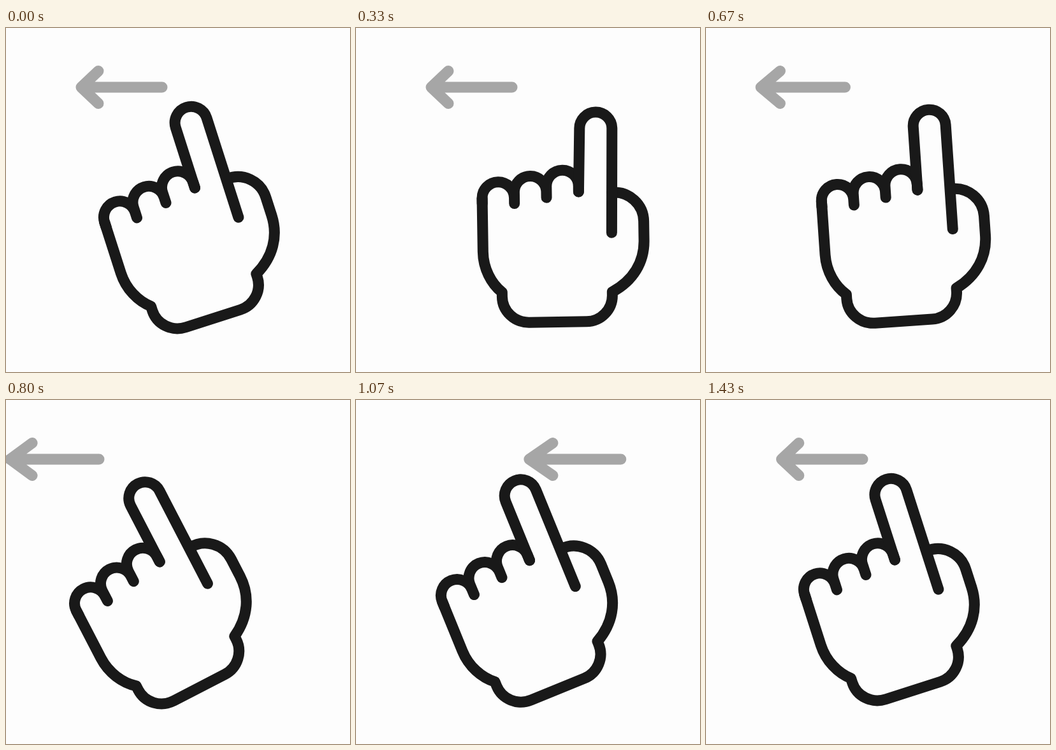
An HTML page for the animation above (1460 ms loop, 540 by 540 pixels).

```html
<!DOCTYPE html>
<html lang="en">
<head>
<meta charset="utf-8">
<title>Swipe left</title>
<style>
  html, body { margin: 0; width: 100%; height: 100%; overflow: hidden; background: #fdfdfd; }
  svg { display: block; width: 100%; height: 100%; }
  path { fill: none; stroke-width: 17; stroke-linecap: round; stroke-linejoin: round; }
  .arrow { stroke: #a6a6a6; }
  #hand { stroke: #191919; }
</style>
</head>
<body>
<svg viewBox="0 0 540 540">
  <path class="arrow" id="leaving"/>
  <path class="arrow" id="entering"/>
  <g id="hand">
    <path d="M-116-196V-112C-116-86-104-62-87-48V-41A42 41 0 0 0-45 0H45A41 41 0 0 0 86-41V-46C119-63 137-92 137-126V-156A46 46 0 0 0 88-202"/>
    <path id="knuckles"/>
    <path id="finger"/>
  </g>
</svg>
<script>
const LOOP = 1460;
const TRAVEL = 627;
const KNUCKLE = 50.5;

const rest = { tilt: 17.8, x: 325, y: 456 };
const windUp = { tilt: -5.2, x: 313, y: 463.5 };
const swipe = { tilt: 29.6, x: 303, y: 450.5 };

const setPath = (id, d) => document.getElementById(id).setAttribute('d', d);
const progress = (t, from, to) => Math.min(1, Math.max(0, (t - from) / (to - from)));
const easeInOut = (u, power) =>
  u < .5 ? (2 * u) ** power / 2 : 1 - (2 - 2 * u) ** power / 2;

function handPose(t) {
  const mix = (a, b, k) => ({
    tilt: a.tilt + (b.tilt - a.tilt) * k,
    x: a.x + (b.x - a.x) * k,
    y: a.y + (b.y - a.y) * k
  });
  if (t < 520) return mix(rest, windUp, easeInOut(progress(t, 0, 520), 2));
  if (t < 895) return mix(windUp, swipe, easeInOut(progress(t, 520, 895), 3));
  return mix(swipe, rest, easeInOut(progress(t, 895, 1205), 2));
}

// The fingertip bends ahead of the hand while it winds up.
function fingerLead(t) {
  const u = progress(t, 0, 520);
  return 95 * u * (1 - u) ** 3;
}

// The tip leads, the barbs and the tail follow slightly later.
function arrowPath(t, shift) {
  const slide = delay => shift - TRAVEL * easeInOut(progress(t - delay, 420, 1495), 3);
  const tip = 118 + slide(0), barb = 145 + slide(9), tail = 245 + slide(15);
  return `M${barb} 67.5L${tip} 93L${barb} 118.5M${tip} 93H${tail}`;
}

function knuckle(i) {
  const left = -116 + KNUCKLE * i, y = -196 - 8.5 * i, r = KNUCKLE / 2;
  return `M${left} ${y + 8.5}V${y}A${r} ${r} 0 0 1 ${left + KNUCKLE} ${y}v9`;
}

function draw(now) {
  const t = now % LOOP;
  const { tilt, x, y } = handPose(t);
  const lead = fingerLead(t);
  document.getElementById('hand')
    .setAttribute('transform', `translate(${x + .3 * lead} ${y}) rotate(${-tilt})`);
  setPath('finger', `M35.5-204L${35.5 + lead}-303a25.5 25.5 0 0 1 51 0L86.5-139`);
  setPath('leaving', arrowPath(t, 0));
  setPath('entering', arrowPath(t, TRAVEL));
  requestAnimationFrame(draw);
}

setPath('knuckles', [0, 1, 2].map(knuckle).join(''));
draw(0);
</script>
</body>
</html>
```
